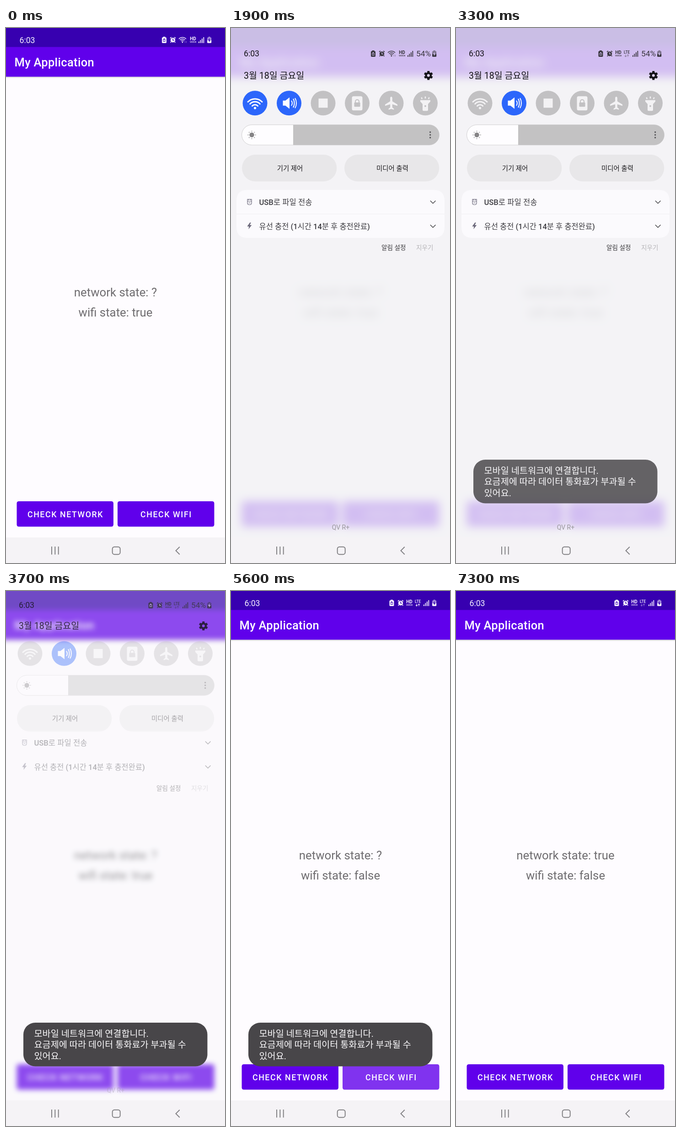
These frames come from a looping animation (479x1170 px, 7400 ms). An HTML page:

```html
<!DOCTYPE html>
<html lang="ko">
<head>
<meta charset="utf-8">
<title>Network check</title>
<style>
html, body { margin: 0; width: 100%; height: 100%; overflow: hidden; background: #fefcff; }
svg { display: block; width: 479px; height: 1170px; font-family: Roboto, "Noto Sans CJK KR", "Noto Sans CJK", sans-serif; }
text { white-space: pre; }
.line { fill: none; stroke: currentColor; }
.mid { text-anchor: middle; }
.med { font-weight: 500; }
.solid { fill: currentColor; }
.hole { fill: var(--hole); }
.cut { fill: none; stroke: var(--hole); }
</style>
</head>
<body>
<svg id="stage" width="479" height="1170"></svg>
<script>
const LOOP = 7400, STEP = 100;

const at = (x, y, body, attrs = '') => `<g transform="translate(${x} ${y})" ${attrs}>${body}</g>`;
const rect = (x, y, w, h, r, attrs = '') => `<rect x="${x}" y="${y}" width="${w}" height="${h}" rx="${r}" ${attrs}/>`;
const text = (x, y, size, str, attrs = '') => `<text x="${x}" y="${y}" font-size="${size}" ${attrs}>${str}</text>`;
const line = (d, width, attrs = 'class="line"') => `<path d="${d}" stroke-width="${width}" ${attrs}/>`;
const fan = (cy, r) => `M${-r * .72} ${cy - r * .69}A${r} ${r} 0 0 1 ${r * .72} ${cy - r * .69}`;
const spokes = (n, a, b, width, turn = 0) => Array.from({ length: n }, (_, i) =>
  `<path d="M0 ${-a}V${-b}" class="line" stroke-width="${width}" transform="rotate(${i * 360 / n + turn})"/>`).join('');

// Status bar icons, each around its own centre
const saver = rect(-5, -5.5, 10, 12.5, 1.8, 'class="solid"') + rect(-2.5, -7, 5, 2.5, .8, 'class="solid"') +
  line('M-2.6 1.2L0 -2.6L2.6 1.2M-2.8 3.2H2.8', 1.3, 'class="cut"');
const alarm = '<circle cy=".4" r="5.2" class="solid"/>' +
  line('M-6 -3.6L-3.2 -5.9M6 -3.6L3.2 -5.9M-4 4.3L-5.2 6M4 4.3L5.2 6', 1.8) +
  line('M0 -2.8V.9H2.9', 1.3, 'class="cut"');
const arrows = '<g class="arrows">' + line('M-2.5 2V7M-4.4 5L-2.5 7L-.6 5M2.5 7.2V2.2M.6 4.2L2.5 2.2L4.4 4.2', 1.1) + '</g>';
const smallWifi = at(-1, 0, line(fan(5.5, 11) + fan(5.5, 7.6) + fan(5.5, 4.2), 1.5) + '<circle cy="5" r="1.4" class="solid"/>') +
  at(6, 1.5, line('M-1.5 1V5M1.5 1V5', 1), 'opacity=".45"');
const hd = text(0, .8, 10, 'HD', 'class="mid solid" font-weight="700"') + text(0, 6.2, 6, 'voice', 'class="mid solid med"');
const lte = text(0, -.2, 8.2, 'LTE', 'class="mid solid med"') + arrows;
const signal = [0, 1, 2, 3].map(i => rect(-6 + i * 3.5, 3.5 - i * 3.2, 1.8, 3.5 + i * 3.2, .4, 'class="solid"')).join('');
const battery = '<g opacity=".55">' + rect(-4.5, -5.5, 9, 12.5, 1.8, 'class="solid"') + rect(-2, -7, 4, 2, .6, 'class="solid"') + '</g>' +
  rect(-4.5, 0, 9, 7, 1.8, 'class="solid"') + '<path d="M1 -4L-3 1.5H-.3L-1 5.5L3 0H.3z" class="hole"/>';

const status = () =>
  `<g class="onWifi">${at(346, 26, saver)}${at(365, 26, alarm)}${at(387, 26, smallWifi)}${at(409, 26, hd)}</g>` +
  `<g class="onLte">${at(351.5, 26, saver)}${at(371, 26, alarm)}${at(390, 26, hd)}${at(408.5, 26, lte)}</g>` +
  at(427, 26, signal);

// Quick setting icons
const tiles = [
  line(fan(12, 21.5) + fan(12, 15) + fan(12, 8.5), 3, 'class="line" stroke-linecap="round"') + '<circle cy="10.7" r="2.6" class="solid"/>',
  '<path d="M-13.5 -5.5H-8L1 -12.5V12.5L-8 5.5H-13.5z" class="solid"/>' +
    line('M5 -5.5Q9 0 5 5.5M9 -9.5Q11.5 -6 11.5 0T9 9.5M13 -11Q16 -6 16 0T13 11', 2),
  rect(-10, -10, 20, 20, 0, 'class="solid"'),
  rect(-11.5, -15, 23, 31, 3.5, 'class="solid"') + rect(-6.5, -1.5, 13, 9.5, 1.5, 'fill="#c2c1c3"') +
    line('M-4 -1V-3.5A4 4 0 0 1 4 -3.5V-1', 2, 'fill="none" stroke="#c2c1c3"'),
  '<path d="M0 -14c1.5 0 2.3 1.5 2.3 3v7l11.2 7v3l-11.2 -3.5v7l3.5 2.7v2.3l-5.8 -1.7l-5.8 1.7v-2.3l3.5 -2.7v-7l-11.2 3.5v-3l11.2 -7v-7c0 -1.5 .8 -3 2.3 -3z" class="solid"/>',
  line('M-8.5 -12.5L-7 -9M0 -14.5V-10M8.5 -12.5L7 -9', 2.4) +
    '<path d="M-11 -6.5H11V-3.5L6 2V14.5Q6 17 3.5 17H-3.5Q-6 17 -6 14.5V2L-11 -3.5z" class="solid"/><circle cy="6.5" r="2" fill="#c2c1c3"/>'
].map((icon, i) => at(52.5 + i * 74.5, 164.3,
  `<circle r="27" fill="${i < 2 ? '#2c66fb' : '#c2c1c3'}" ${i ? '' : 'id="wifiTile"'}/>${icon}`,
  `color="${i < 2 ? '#fdfdff' : '#f3f2f4'}" ${i ? '' : 'id="wifiIcon"'}`)).join('');

const gear = '<circle r="5.2" class="line" stroke-width="4.4"/>' + spokes(6, 6, 9.8, 5);
const sun = '<circle r="5.2" class="solid"/>' + spokes(8, 7.2, 9, 1.5);
const chevron = line('M-5.8 -2.8L0 3L5.8 -2.8', 1.5);

const button = (x, name, label) =>
  `<clipPath id="${name}Clip">${rect(x, 1035, 211.5, 55.5, 4.5)}</clipPath>` +
  rect(x, 1035, 211.5, 55.5, 4.5, 'fill="#6000eb"') +
  `<g clip-path="url(#${name}Clip)"><circle id="${name}Ripple" cy="1064" fill="#fff"/></g>` +
  text(x + 106.5, 1070, 17.8, label, 'class="mid med" letter-spacing="1.58" fill="#fff"');

const app = `<g id="app">
  ${rect(-60, -60, 600, 1300, 0, 'fill="#fefcff"')}
  ${rect(-60, 106, 600, 4, 0, 'fill="url(#shade)"')}
  ${rect(-60, 41, 600, 65.5, 0, 'fill="#6000eb"')}
  ${rect(-60, -60, 600, 101.5, 0, 'fill="#3700b0"')}
  <g id="appStatus" color="#f6f2ff" style="--hole:#3700b0">
    ${text(29.5, 32.8, 17.6, '6:03', 'class="solid"')}${status()}${at(444.7, 26, battery)}
  </g>
  ${text(18.5, 84, 25.5, 'My Application', 'class="med" letter-spacing=".32" fill="#fff"')}
  ${text(239.5, 587, 25.8, '', 'id="netText" class="mid" fill="#6f6d70"')}
  ${text(239.5, 631, 25.8, '', 'id="wifiText" class="mid" fill="#6f6d70"')}
  ${button(23.5, 'net', 'CHECK NETWORK')}${button(244, 'wifi', 'CHECK WIFI')}
</g>`;

const header = `<g id="header" color="#151418" style="--hole:#d2c2ee">
  <g id="topRow">
    ${text(28, 62.3, 17.6, '6:03', 'class="solid"')}
    <g color="#39363f">${at(-35, 30, status())}${text(405, 62.3, 17.4, '54%', 'class="solid"')}${at(444.7, 56, battery)}</g>
  </g>
  <g id="dateRow">${text(28, 111, 19.5, '3월 18일 금요일', 'class="solid"')}${at(431.8, 103.8, gear)}</g>
</g>`;

const controls = `<g id="controls">${tiles}
  <clipPath id="barClip">${rect(23.5, 211.5, 432, 44.5, 22.2)}</clipPath>
  <g clip-path="url(#barClip)">${rect(23, 211, 433, 46, 0, 'fill="#c3c2c3"')}${rect(23, 211, 113, 46, 0, 'fill="#fefdff"')}</g>
  ${rect(23.5, 211.7, 432, 44.2, 22.1, 'fill="none" stroke="#c9c8ca" stroke-width=".8"')}
  ${at(45.5, 233.8, sun, 'color="#858486"')}
  ${[227.8, 233.8, 239.8].map(y => `<circle cx="435.7" cy="${y}" r="1.7" fill="#555457"/>`).join('')}
  ${[[24, '기기 제어'], [248, '미디어 출력']].map(([x, label]) =>
    rect(x, 277, 207.3, 58.5, 29.2, 'fill="#e8e7e9"') +
    text(x + 105, 312, 14.4, label, 'class="mid med" fill="#1b1a1d"')).join('')}
</g>`;

const notices = `<g id="notices">
  <path d="M12 406V378Q12 354 36 354H443Q467 354 467 378V406z" fill="#fbfafd"/>
  <path d="M12 407.5V435Q12 459 36 459H443Q467 459 467 435V407.5z" fill="#fbfafd"/>
  <g color="#6d6a7c">
    ${at(40.5, 380.5, line('M-4.5 -6H4.5V-1.5H-4.5zM-4.5 -1.5V2Q-4.5 6 0 6T4.5 2V-1.5M-2 -6V-3.5M2 -6V-3.5M-2 2H2', 1.2))}
    ${at(40.3, 433, '<path d="M1 -7.5L-5 1H-1L-2 7L5 -2H.8L3.5 -7.5z" class="solid"/>')}
  </g>
  ${text(61.5, 386.7, 16.6, 'USB로 파일 전송', 'class="med" fill="#3e3d42"')}
  ${text(61.5, 439.7, 16.5, '유선 충전 (1시간 14분 후 충전완료)', 'class="med" fill="#3e3d42"')}
  <g color="#444347">${at(441.7, 380.5, chevron)}${at(441.7, 433.3, chevron)}</g>
  ${text(329, 484.6, 13.6, '알림 설정', 'class="med" fill="#3a393c"')}
  ${text(405, 484.6, 13.6, '지우기', 'fill="#b5b4b7"')}
</g>`;

const nav = rect(0, 1114, 479, 56, 0, 'fill="#f5f3f6"') + `<g color="#838285">
  ${line('M100 1134V1151.5M107.3 1134V1151.5M114.7 1134V1151.5', 2)}
  ${rect(232.7, 1134.7, 17, 16.5, 4.5, 'class="line" stroke-width="2"')}
  ${line('M379.8 1134.8L371.5 1143L379.8 1151.2', 2)}</g>`;

const toast = `<g id="toast">${rect(38, 944, 402.5, 95.5, 26, 'fill="#484649"')}
  ${['모바일 네트워크에 연결합니다.', '요금제에 따라 데이터 통화료가 부과될 수', '있어요.']
    .map((s, i) => text(61.5, 975.3 + i * 24.1, 19.7, s, 'fill="#fbfafc"')).join('')}</g>`;

const stage = document.getElementById('stage');
stage.innerHTML = `<linearGradient id="shade" x2="0" y2="1"><stop stop-color="#000" stop-opacity=".2"/><stop offset="1" stop-color="#000" stop-opacity="0"/></linearGradient>
  ${app}${rect(0, 0, 479, 1170, 0, 'id="veil" fill="#f2f1f4"')}${nav}
  <g id="panel">${header}${controls}${notices}${text(240, 1097, 14, 'QV R+', 'id="carrier" class="mid" fill="#99979c"')}</g>${toast}`;

const $ = id => document.getElementById(id);
const set = (id, attrs) => Object.entries(attrs).forEach(([k, v]) => $(id).setAttribute(k, v));
const show = (nodes, on) => nodes.forEach(n => n.style.display = on ? '' : 'none');
const all = sel => [...stage.querySelectorAll(sel)];
const wifiMarks = all('.onWifi'), lteMarks = all('.onLte'), arrowMarks = all('.arrows');

const ramp = (t, a, b) => Math.min(1, Math.max(0, (t - a) / (b - a)));
const ease = u => (1 - Math.cos(Math.PI * u)) / 2;
const mix = (a, b, u) => a + (b - a) * u;
const blend = (a, b, u) => `rgb(${a.map((v, i) => Math.round(mix(v, b[i], u)))})`;

function ripple(id, x, age) {
  const on = age >= 0 && age < 400;
  set(id, { cx: x, r: 86 + Math.max(0, age) * .6, opacity: on ? .2 * (1 - ramp(age, 100, 400)) : 0 });
}

function draw(t) {
  const open = t >= 1300 && t < 4100;
  const p = ease(ramp(t, 1300, 1900)) * (1 - ease(ramp(t, 3300, 4000)));
  const body = ramp(p, .08, .9);

  $('app').style.filter = open ? `blur(${mix(3, 10, p)}px)` : 'none';
  show([$('appStatus')], !open);
  show([$('panel'), $('veil')], open);
  set('veil', { opacity: .79 * p });
  set('header', { opacity: mix(.68, 1, p) });
  set('topRow', { transform: `translate(0 ${-41 * (1 - p)})` });
  set('dateRow', { transform: `translate(0 ${-45 * (1 - p)})` });
  set('controls', { transform: `translate(0 ${-45 * (1 - p)})`, opacity: body });
  set('notices', { transform: `translate(0 ${-80 * (1 - p)})`, opacity: body });
  set('carrier', { opacity: body });

  const off = ramp(t, 2400, 2800);
  set('wifiTile', { fill: blend([44, 102, 251], [194, 193, 195], off) });
  set('wifiIcon', { color: blend([253, 253, 255], [243, 242, 244], off) });
  show(wifiMarks, t < 3000);
  show(lteMarks, t >= 3000);
  arrowMarks.forEach(n => n.setAttribute('opacity', t >= 4100 && t < 6500 ? 1 : .45));

  $('netText').textContent = 'network state: ' + (t < 6900 ? '?' : 'true');
  $('wifiText').textContent = 'wifi state: ' + (t < 5600 ? 'true' : 'false');
  ripple('wifiRipple', 350, t - 5500);
  ripple('netRipple', 165, t - 6800);
  set('toast', { opacity: ramp(t, 2900, 3380) * (1 - ramp(t, 6800, 7200)) });
}

const start = performance.now();
function frame() {
  const t = (performance.now() - start) % LOOP;
  draw(Math.floor(t / STEP) * STEP);
  requestAnimationFrame(frame);
}
frame();
</script>
</body>
</html>
```
